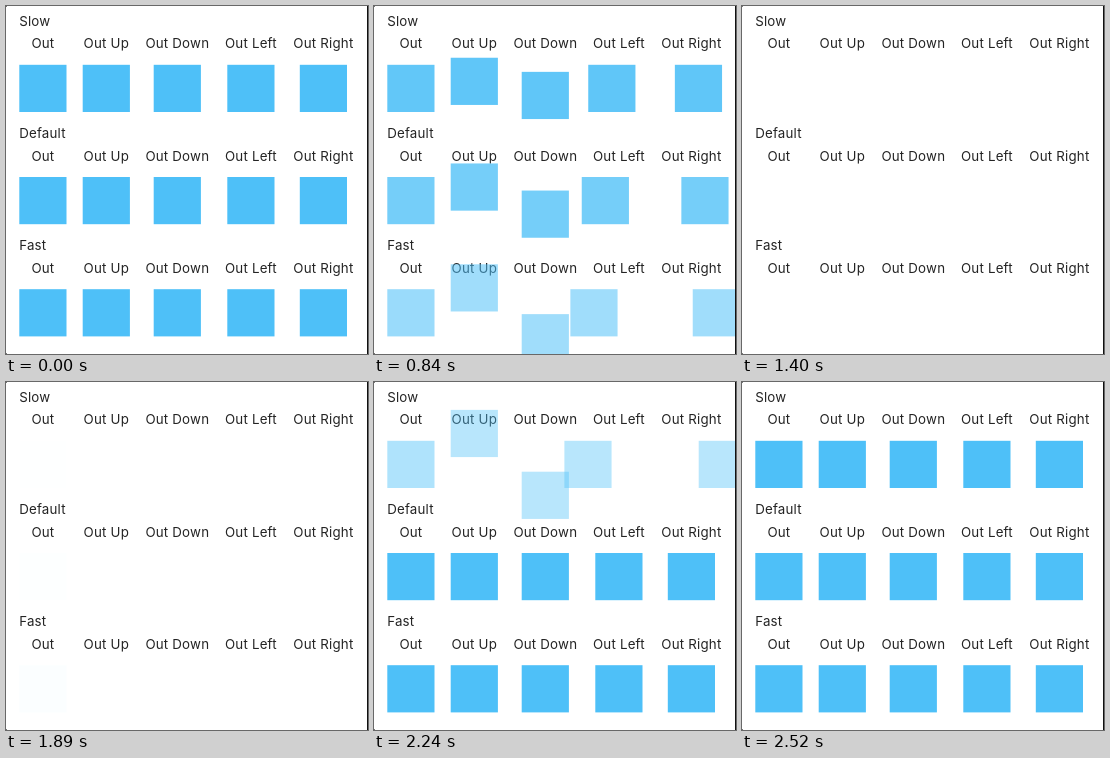
An HTML page with a canvas that plays this animation: 362 px wide and 348 px high, repeating every 2.94 s.

```html
<!DOCTYPE html>
<html lang="en">
<head>
<meta charset="utf-8">
<title>Fade out transitions</title>
<style>
  html, body { margin: 0; width: 100%; height: 100%; overflow: hidden; background: #fff; }
  canvas { display: block; }
</style>
</head>
<body>
<canvas id="stage" width="362" height="348"></canvas>
<script>
const ctx = document.getElementById('stage').getContext('2d');
const LOOP = 2940, TICK = 70, SIZE = 47.2, ROW = 112.2;
const OUT_START = 793, IN_START = 1880;

const rows = [
  { name: 'Slow', out: 590, in: 640 },
  { name: 'Default', out: 295, in: 320 },
  { name: 'Fast', out: 147, in: 147 }
];
const columns = [
  { name: 'Out', x: 13.3, dx: 0, dy: 0 },
  { name: 'Out Up', x: 76.7, dx: 0, dy: -1 },
  { name: 'Out Down', x: 147.7, dx: 0, dy: 1 },
  { name: 'Out Left', x: 221.3, dx: -1, dy: 0 },
  { name: 'Out Right', x: 293.8, dx: 1, dy: 0 }
];

const clamp = v => Math.min(1, Math.max(0, v));

// 1 = fully shown, 0 = gone
function presence(row, t) {
  if (t < IN_START) return Math.pow(1 - clamp((t - OUT_START) / row.out), 1.95);
  return Math.pow(clamp((t - IN_START) / row.in), 1.85);
}

function opacity(col, shown) {
  if (!col.dx && !col.dy) return Math.pow(shown, 0.75);
  return shown < 0.11 ? 0 : 1 - Math.pow(1 - shown, 1.2);
}

function drawRow(row, y, t) {
  ctx.fillStyle = '#242424';
  ctx.textAlign = 'left';
  ctx.fillText(row.name, 13.2, y + 19.7);
  ctx.textAlign = 'center';
  for (const col of columns) ctx.fillText(col.name, col.x + SIZE / 2, y + 42.4);

  const shown = presence(row, t);
  const shift = (1 - shown) * SIZE;
  ctx.fillStyle = '#4ec0f8';
  for (const col of columns) {
    ctx.globalAlpha = opacity(col, shown);
    ctx.fillRect(col.x + col.dx * shift, y + 58.8 + col.dy * shift, SIZE, SIZE);
  }
  ctx.globalAlpha = 1;
}

function drawEdges() {
  ctx.fillStyle = '#111';
  ctx.fillRect(361, 0, 1, 348);
  ctx.fillStyle = '#777';
  ctx.fillRect(0, 0, 1, 1);
  ctx.fillRect(0, 347, 1, 1);
}

function frame() {
  const t = Math.floor((performance.now() % LOOP) / TICK) * TICK;
  ctx.fillStyle = '#fff';
  ctx.fillRect(0, 0, 362, 348);
  ctx.font = '13.3px Inter, Roboto, sans-serif';
  ctx.letterSpacing = '0.2px';
  rows.forEach((row, i) => drawRow(row, i * ROW, t));
  drawEdges();
  requestAnimationFrame(frame);
}
frame();
</script>
</body>
</html>
```
